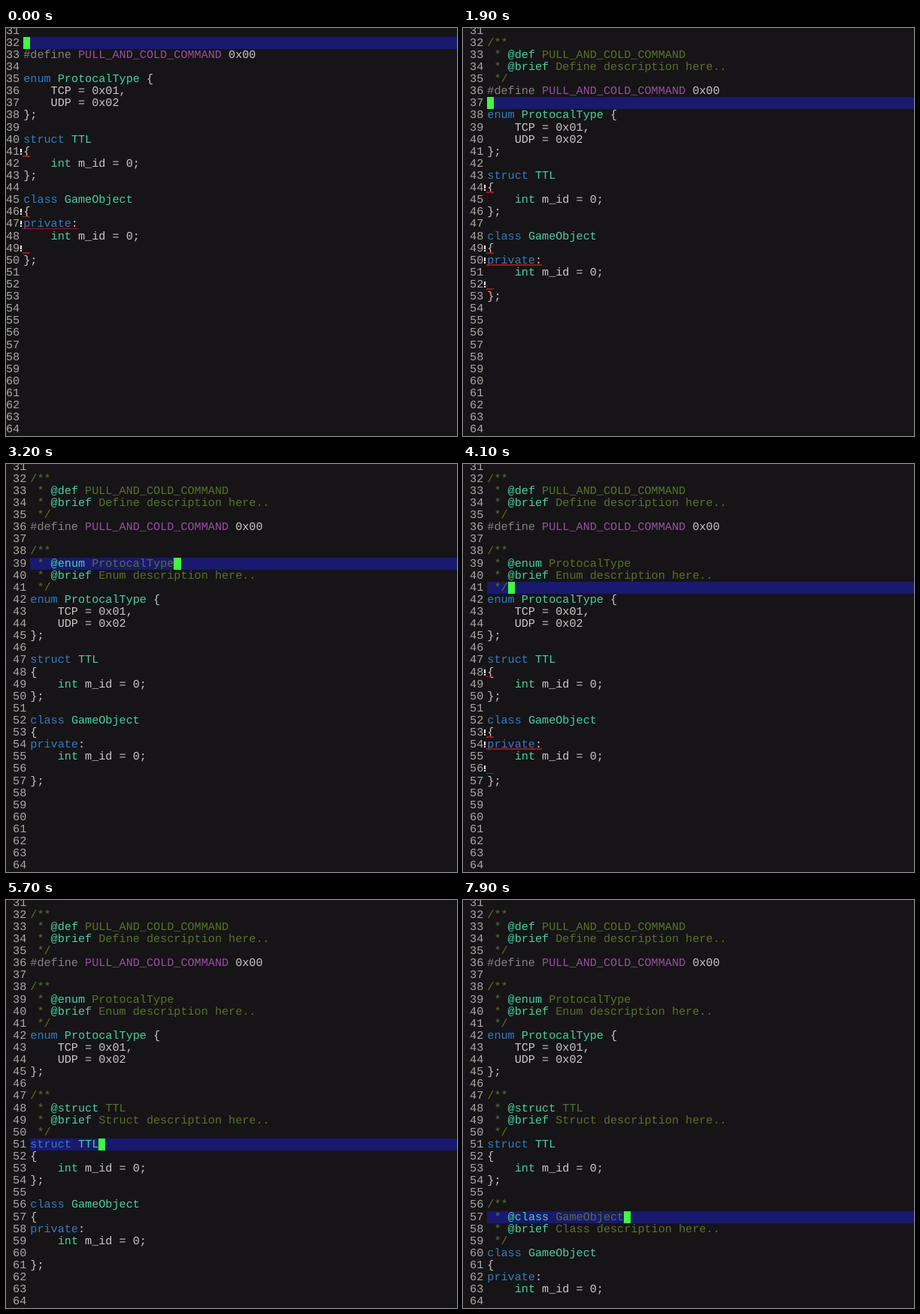
An HTML page for the animation above (8000 ms loop, 600 px wide and 544 px high).

```html
<!DOCTYPE html>
<html lang="en">
<head>
<meta charset="utf-8">
<title>Doc comment typing</title>
<style>
  html, body { margin: 0; width: 100%; height: 100%; overflow: hidden; background: #161416; }
  #stage {
    position: relative; width: 600px; height: 544px; overflow: hidden;
    background: #161416; color: #c9c7c6;
    font: 15.17px/16.11px "Liberation Mono", "Courier New", monospace;
    text-rendering: geometricPrecision; font-variant-ligatures: none;
  }
  .row { position: absolute; left: 0; width: 600px; height: 16.11px; white-space: pre; }
  .row > * { position: absolute; top: 0; height: 16.11px; }
  .num { color: #aaa9a5; }
  .bar { right: 0; background: #191970; }
  .cursor { width: 9.1px; background: #3cff3c; color: #e4f5d8; }
  .row > .wave { top: 13.2px; height: 1.7px; background: #a5121c; }
  .row > .mark { top: 4px; width: 2px; height: 8px; background: linear-gradient(#eee 5px, transparent 5px 6px, #eee 6px); }
  .key { color: #2b7fc4; }
  .type { color: #3fd3a0; }
  .note { color: #58722a; }
  .macro { color: #95519f; }
  .pre { color: #858383; }
</style>
</head>
<body>
<div id="stage"></div>
<script>
const LOOP = 8000, FIRST = 31, LAST = 64;
const CHAR = 9.102, ROW = 16.11, TOP = 11.8 - ROW;
const stage = document.getElementById('stage');

const source = `

#define PULL_AND_COLD_COMMAND 0x00

enum ProtocalType {
    TCP = 0x01,
    UDP = 0x02
};

struct TTL
{
    int m_id = 0;
};

class GameObject
{
private:
    int m_id = 0;

};`.split('\n');

// Editing actions; each changes the editor state s
const at = s => s.row - FIRST;
const type = (text, col) => s => { s.lines[at(s)] = text; s.col = s.goal = col; };
const open = s => { s.lines.splice(at(s) + 1, 0, ''); s.row++; s.col = s.goal = 0; };
const down = s => { s.row++; s.col = Math.min(s.goal, s.lines[at(s)].length); };
const check = s => { s.errors = true; };
const expand = (tag, name, kind) => s => {
  const head = ` * @${tag} ${name}`;
  s.lines.splice(at(s), 1, '/**', head, ` * @brief ${kind} description here..`, ' */');
  s.row++;
  s.col = s.goal = head.length;
  s.errors = false;
  s.wide = 1;
};

const steps = [];
const add = (time, act) => steps.push({ time, act });
const walk = (time, count) => { for (let i = 0; i < count; i++) add(time + i * 100, down); };
const comment = (slash, star, second, done, ...doc) => {
  add(slash, type('/', 1));
  add(star, type('/**/', 2));
  add(second, type('/***/', 3));
  add(done, expand(...doc));
};

comment(400, 600, 800, 1000, 'def', 'PULL_AND_COLD_COMMAND', 'Define');
add(1500, check);
walk(1600, 4);
add(2300, open);
comment(2600, 2800, 2900, 3200, 'enum', 'ProtocalType', 'Enum');
add(3800, check);
walk(4000, 7);
add(4800, open);
comment(5000, 5100, 5300, 5400, 'struct', 'TTL', 'Struct');
walk(5500, 7);
add(5900, check);
add(6300, open);
comment(6900, 7100, 7300, 7600, 'class', 'GameObject', 'Class');
steps.sort((a, b) => a.time - b.time);

const span = (cls, text) => `<span class="${cls}">${text}</span>`;

function paint(line) {
  if (/^(\/\*| \*)/.test(line))
    return span('note', line.replace(/@\w+/, tag => span('type', tag)));
  return line
    .replace(/^(#define) (\w+)/, (_, a, b) => span('pre', a) + ' ' + span('macro', b))
    .replace(/^(enum|struct|class) (\w+)/, (_, a, b) => span('key', a) + ' ' + span('type', b))
    .replace(/^private/, word => span('key', word))
    .replace(/\bint\b/, word => span('type', word));
}

const faulty = (lines, i) =>
  lines[i] === '{' || lines[i] === 'private:' || (lines[i] === '' && lines[i + 1] === '};' && i > 0);

function box(cls, x, text = '', width) {
  const size = width ? `;width:${width}px` : '';
  return `<div class="${cls}" style="left:${x}px${size}">${text}</div>`;
}

function render(s) {
  const shift = s.wide * CHAR, left = 23.2 + shift;
  let html = '';
  for (let n = FIRST; n <= LAST; n++) {
    const i = n - FIRST, line = s.lines[i] || '';
    let row = box('num', shift, n);
    if (n === s.row) row += box('bar', left);
    row += box('code', left, paint(line));
    if (s.errors && faulty(s.lines, i))
      row += box('mark', left - 4, '') + box('wave', left - 1, '', Math.max(1, line.length) * CHAR + 1);
    if (n === s.row) row += box('cursor', left + s.col * CHAR, line[s.col] || '');
    html += `<div class="row" style="top:${TOP + i * ROW}px">${row}</div>`;
  }
  stage.innerHTML = html;
}

let shown = -1;
const start = performance.now();

function tick() {
  const t = Math.max(0, performance.now() - start) % LOOP;
  const due = steps.filter(step => step.time <= t);
  if (due.length !== shown) {
    shown = due.length;
    const state = { lines: [...source], row: 32, col: 0, goal: 0, errors: true, wide: 0 };
    due.forEach(step => step.act(state));
    render(state);
  }
  requestAnimationFrame(tick);
}
tick();
</script>
</body>
</html>
```
